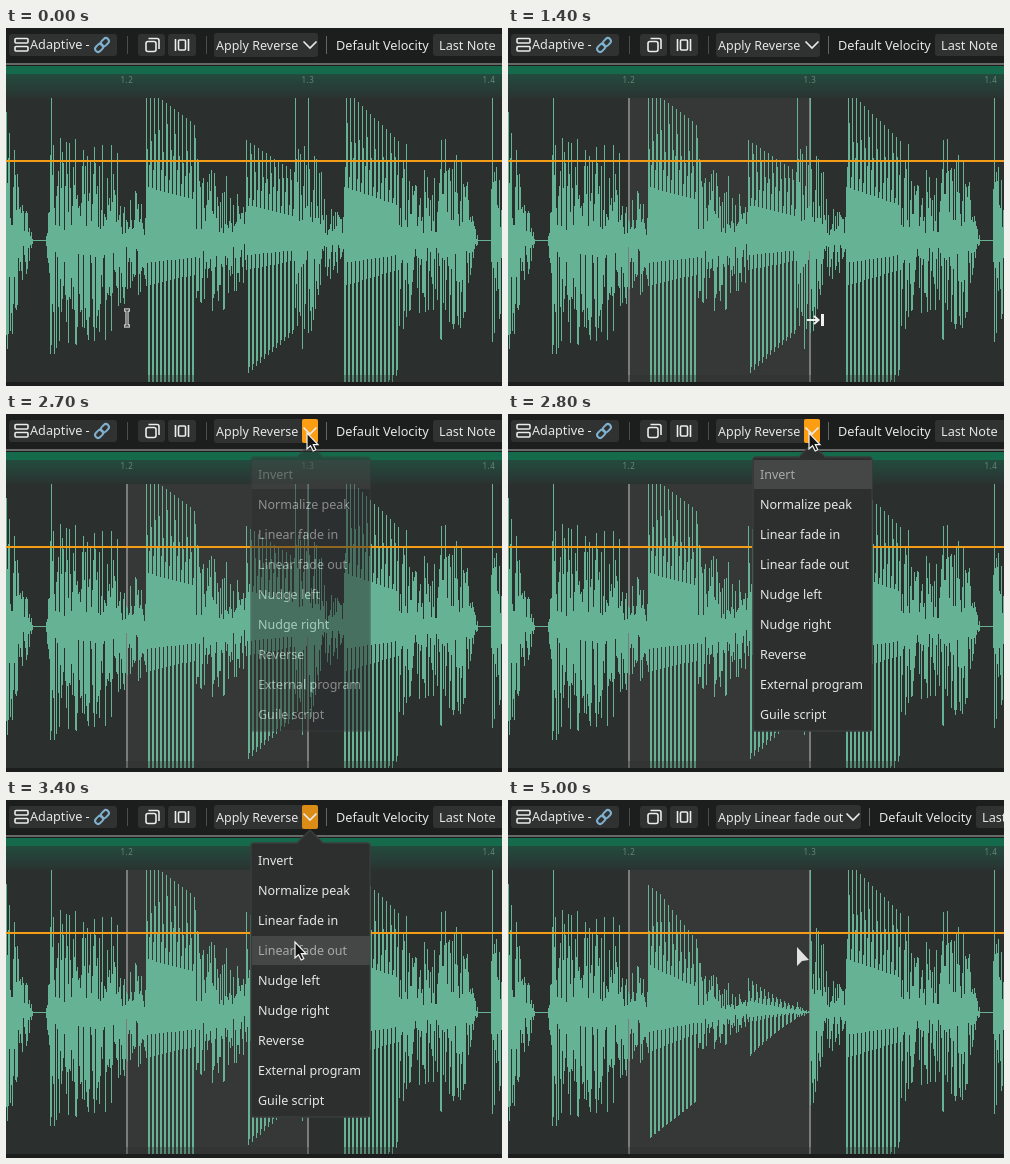
Write an HTML page that moves like this. It is 496x358 px and loops after 5.1 s.

```html
<!DOCTYPE html>
<html lang="en">
<head>
<meta charset="utf-8">
<title>Audio clip editor</title>
<style>
  html, body { margin: 0; width: 100%; height: 100%; overflow: hidden; background: #1c1d1d; }
  svg { display: block; width: 496px; height: 358px; }
  text { font: 12.7px "Noto Sans", sans-serif; fill: #e6e6e6; white-space: pre; }
  .ruler text { font-size: 8px; letter-spacing: .6px; fill: #66857a; text-anchor: middle; }
  .menu text, #applyText { font-size: 12.5px; }
  .btn { fill: #303131; }
  .icon { fill: none; stroke: #ececec; stroke-width: 1.6; }
  .sep { fill: #4b4c4c; }
  .wave { stroke: #65b394; fill: none; shape-rendering: crispEdges; }
</style>
</head>
<body>
<svg viewBox="0 0 496 358">
  <defs>
    <linearGradient id="rulerFill" x2="0" y2="1">
      <stop offset="0" stop-color="#234b3e"/>
      <stop offset="1" stop-color="#2a3331"/>
    </linearGradient>
  </defs>
  <rect width="496" height="358" fill="#1c1d1d"/>
  <rect y="35" width="496" height="2" fill="#666767"/>
  <rect y="38" width="496" height="8" fill="#166a4c"/>
  <rect y="46" width="496" height="24" fill="url(#rulerFill)"/>
  <rect y="70" width="496" height="284" fill="#2b302f"/>
  <g class="ruler" id="ruler"></g>

  <g id="selection">
    <rect id="range" x="121" y="70" height="284" fill="#363838"/>
    <rect x="120" y="70" width="2" height="284" fill="#7b7d7c"/>
    <rect id="rangeEnd" y="70" width="2" height="284" fill="#7b7d7c"/>
  </g>
  <path class="wave" id="wave"/>
  <rect y="347" width="496" height="7" fill="#2b302f" opacity=".3"/>
  <rect y="132" width="496" height="2" fill="#f39c16"/>

  <rect class="btn" x="3" y="6" width="108" height="22" rx="3"/>
  <g class="icon">
    <rect x="9" y="10.5" width="13" height="4.5" rx="1"/>
    <rect x="9" y="18.5" width="13" height="4.5" rx="1"/>
  </g>
  <text x="24" y="21">Adaptive - </text>
  <g fill="none" stroke="#7fb0cd" stroke-width="2" transform="rotate(-45 96 17)">
    <rect x="87.5" y="14" width="9" height="6" rx="3"/>
    <rect x="95.5" y="14" width="9" height="6" rx="3"/>
  </g>
  <rect class="btn" x="132" y="6" width="27" height="22" rx="3"/>
  <rect class="btn" x="162" y="6" width="28" height="22" rx="3"/>
  <g class="icon">
    <rect x="140" y="13.5" width="10" height="10" rx="2"/>
    <path d="M142.5 10.5H151Q153 10.5 153 12.5V21"/>
    <rect x="172.5" y="12" width="7" height="10" rx="1"/>
    <path d="M169.500 11V23M182.500 11V23"/>
  </g>
  <rect class="sep" x="121" y="8" width="1" height="18"/>
  <rect class="sep" x="200" y="8" width="1" height="18"/>
  <rect class="btn" id="apply" x="208" y="5" height="24" rx="3"/>
  <text id="applyText" x="210" y="22"></text>
  <g id="drop">
    <rect id="hover" x="296" y="5" width="16" height="24" rx="2" fill="#4a4b4b"/>
    <rect id="glow" x="296" y="5" width="16" height="24" rx="2" fill="#fd9d12"/>
    <path class="icon" d="M297.500 13.500L304 20L310.500 13.500"/>
  </g>
  <g id="tail">
    <rect x="320" y="8" width="1" height="18" fill="#636464"/>
    <text x="330" y="22">Default Velocity</text>
    <rect class="btn" x="427" y="6" width="80" height="22" rx="3"/>
    <text x="433" y="22">Last Note</text>
  </g>

  <g class="menu" id="menu">
    <path d="M248 43H291L304 30L317 43H361Q364 43 364 46V314Q364 317 361 317H248Q245 317 245 314V46Q245 43 248 43Z"
          fill="#2d2f2f" stroke="#3a3c3c" stroke-width="1.5"/>
    <rect id="row" x="246" width="118" height="29" fill="#454646"/>
  </g>

  <g id="cursor">
    <g>
      <path d="M-3 -8H3M0 -8V8M-3 8H3" stroke="#fff" stroke-width="3"/>
      <path d="M-2.500 -8H2.500M0 -8V8M-2.500 8H2.500" stroke="#111"/>
    </g>
    <g>
      <path d="M-9 0H2M-2 -4L2.500 0L-2 4" fill="none" stroke="#f0f0f0" stroke-width="2"/>
      <rect x="5" y="-6" width="3" height="12" fill="#f0f0f0"/>
    </g>
    <path d="M0 0V16L3.500 12.800L6.200 18L8.800 16.800L6.300 11.600H11Z" fill="#151515" stroke="#f4f4f4" stroke-width="1.2"/>
    <path d="M0 0V19L5 14L12 13Z" fill="#e2e2e2"/>
  </g>
</svg>
<script>
const $ = id => document.getElementById(id);
const LOOP = 5100, STEP = 100, MID = 212, LIMIT = 142;
const FROM = 121, BEAT = 181, TO = FROM + BEAT;
const ITEMS = ["Invert", "Normalize peak", "Linear fade in", "Linear fade out", "Nudge left",
  "Nudge right", "Reverse", "External program", "Guile script"];

function addText(parent, x, y, text) {
  const el = document.createElementNS("http://www.w3.org/2000/svg", "text");
  el.setAttribute("x", x);
  el.setAttribute("y", y);
  el.textContent = text;
  return parent.appendChild(el);
}
const set = (id, attrs) => { for (const k in attrs) $(id).setAttribute(k, attrs[k]); };
const show = (el, on) => el.style.display = on ? "" : "none";
const mix = (a, b, u) => a + (b - a) * u;

["1.2", "1.3", "1.4"].forEach((s, i) => addText($("ruler"), FROM + BEAT * i, 55, s));
const labels = ITEMS.map((s, i) => addText($("menu"), 252, 65 + 30 * i, s));

// Sounds: start, end, loudness at start and end, then whether pitched
const sounds = [
  [0, 27, 110, 4], [40, 44, 8, 40], [44, 112, 105, 95], [112, 140, 62, 46],
  [140, 190, 152, 114, true], [190, 240, 95, 38], [240, 290, 100, 67, true],
  [290, 318, 110, 70], [318, 338, 42, 26], [338, 393, 152, 98, true],
  [393, 432, 90, 60], [432, 462, 105, 92], [462, 472, 42, 2], [485, 496, 105, 75]
];
const hits = [45, 289, 302, 486];

let seed = 91;
const rand = () => (seed = seed * 16807 % 2147483647) / 2147483647;

// Pitched sound swings up and down every four columns, noise is ragged
function column(x) {
  const sound = sounds.find(([a, b]) => x >= a && x < b);
  if (!sound) return [.5, .5];
  const [a, b, first, last, pitched] = sound;
  const loud = mix(first, last, (x - a) / (b - a));
  if (hits.includes(x)) return [LIMIT, loud];
  if (pitched) {
    const swing = Math.cos(x * Math.PI / 2);
    return swing > .5 ? [loud, loud * .3]
      : swing < -.5 ? [loud * .35, loud * 1.35]
      : x % 4 === 1 ? [loud * mix(.6, .9, rand()), loud * .15]
      : [loud * mix(.4, .65, rand()), loud * 1.3];
  }
  const peak = rand() < .08 ? 1.2 : 1;
  return [loud * peak * mix(.1, 1, rand()), loud * 1.1 * mix(.1, 1, rand())];
}
const columns = Array.from({ length: 496 }, (_, x) => column(x));

function wavePath(faded) {
  return columns.map(([up, down], x) => {
    const gain = faded && x >= FROM && x < TO ? (TO - x) / BEAT : 1;
    const h = v => Math.max(.5, Math.min(LIMIT, v) * gain);
    return `M${x + .5} ${(MID - h(up)).toFixed(1)}V${(MID + h(down)).toFixed(1)}`;
  }).join("");
}
const waves = [wavePath(false), wavePath(true)];

// Pointer moves, in steps of the clock
const moves = [
  { from: 7, to: 13, x: 305, y: 292 },
  { from: 13, to: 14, x: 308, y: 292 },
  { from: 14, to: 20, x: 282, y: 37 },
  { from: 20, to: 24, x: 301, y: 19 },
  { from: 28, to: 34, x: 289, y: 142 },
  { from: 34, to: 36, x: 289, y: 147 }
];
function pointer(s) {
  let x = 121, y = 290;
  for (const m of moves) {
    const u = Math.min(1, Math.max(0, (s - m.from) / (m.to - m.from))) ** 1.5;
    x = mix(x, m.x, u);
    y = mix(y, m.y, u);
  }
  return [Math.round(x), Math.round(y)];
}

function draw(s) {
  const [x, y] = pointer(s);
  const picked = s >= 8, done = s >= 39;
  const dragging = picked && s < 15, overMenu = s >= 30;

  const shape = dragging ? 1 : s < 20 ? 0 : done ? 3 : 2;
  [...$("cursor").children].forEach((el, i) => show(el, i === shape));
  set("cursor", { transform: `translate(${x} ${y})` });

  // The selection end snaps to the nearest beat
  const end = !dragging || x > FROM + BEAT / 2 ? TO : FROM;
  show($("selection"), picked);
  set("range", { width: end - FROM });
  set("rangeEnd", { x: end - 1 });
  set("wave", { d: waves[+done] });

  const shift = done ? 41 : 0;
  set("apply", { width: 104 + shift });
  $("applyText").textContent = "Apply " + (done ? ITEMS[3] : "Reverse");
  for (const id of ["drop", "tail"]) set(id, { transform: `translate(${shift} 0)` });
  set("hover", { opacity: s >= 23 && !overMenu ? 1 : 0 });
  const fade = Math.min(1, Math.max(0, (44 - s) / 3));
  set("glow", { opacity: s < 27 ? 0 : overMenu ? .84 * fade : 1 });

  show($("menu"), s >= 27 && !done);
  set("menu", { opacity: s === 27 || s === 38 ? .5 : 1 });
  const active = Math.max(0, Math.floor((y - 45) / 30));
  set("row", { y: 46 + 30 * active });
  labels.forEach((el, i) => el.style.fill = i === active ? "#a9aaaa" : "");
}

const start = performance.now();
let last = -1;
function tick() {
  const s = Math.floor((performance.now() - start) % LOOP / STEP);
  if (s !== last) draw(last = s);
  requestAnimationFrame(tick);
}
tick();
</script>
</body>
</html>
```
